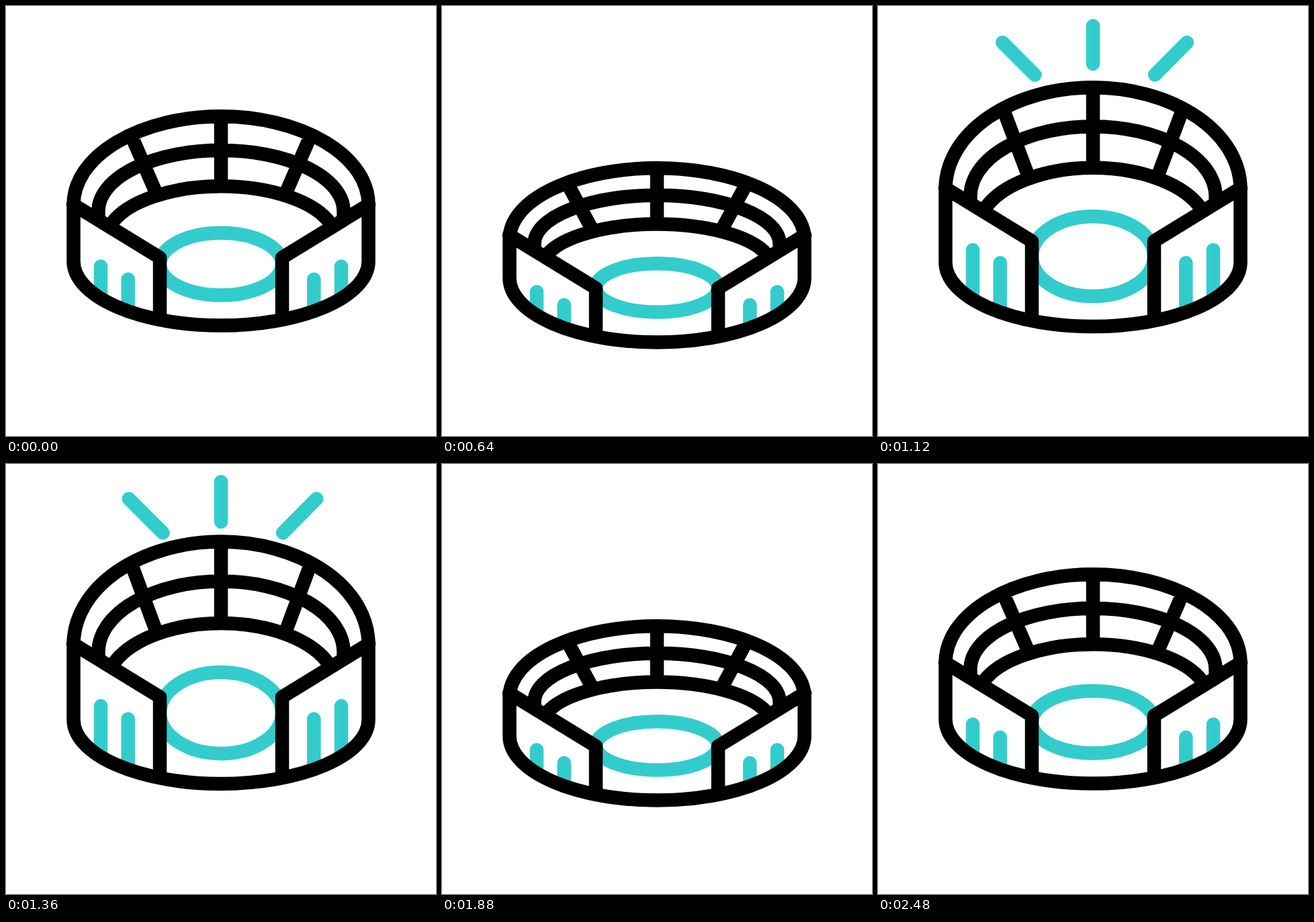
Recreate the animation shown at these times as an HTML page. Size 640x640 px, loop 2800 ms.

```html
<!DOCTYPE html>
<html lang="en">
<head>
<meta charset="utf-8">
<title>Stadium</title>
<style>
html, body { margin: 0; width: 100%; height: 100%; overflow: hidden; background: #fff; }
svg { display: block; width: 100%; height: 100%; }
path { fill: none; stroke-width: 20.5; stroke-linecap: round; stroke-linejoin: round; }
#teal { stroke: #33cccc; }
#black { stroke: #000; }
</style>
</head>
<body>
<svg viewBox="0 0 640 640">
  <path id="teal"/>
  <path id="black"/>
</svg>
<script>
const LOOP = 2800, STEP = 40, CX = 320, RX = 219.5, TOP = 164.3;
const teal = document.getElementById('teal');
const black = document.getElementById('black');

// Cubic bezier easing with control points (x1, 0) and (x2, 1).
function ease(x, x1, x2) {
  if (x <= 0) return 0;
  if (x >= 1) return 1;
  let lo = 0, hi = 1, s = 0.5;
  for (let i = 0; i < 30; i++) {
    s = (lo + hi) / 2;
    const v = 3 * x1 * s * (1 - s) ** 2 + 3 * x2 * s * s * (1 - s) + s ** 3;
    if (v < x) lo = s; else hi = s;
  }
  return s * s * (3 - 2 * s);
}

const REST = [0, 0], SQUASH = [77, 25], STRETCH = [-51, 0];

// start, end, from, to, easing x2; poses are [top shift, bottom shift]
const MOVES = [
  [200, 640, REST, SQUASH, 0.65],
  [640, 1320, SQUASH, STRETCH, 0.23],
  [1320, 1880, STRETCH, SQUASH, 0.23],
  [1880, 2480, SQUASH, REST, 0.4]
];

// inner x, inner y, outer x, outer y
const RAYS = [[320, 86, 320, 21], [233.5, 102.5, 178, 47], [412, 102.5, 467, 47]];

function poseAt(t) {
  const move = MOVES.find(m => t < m[1]);
  if (!move) return REST;
  const [start, end, from, to, x2] = move;
  const p = ease((t - start) / (end - start), 0.333, x2);
  return from.map((v, i) => v + (to[i] - v) * p);
}

function rayAt(t) {
  return t <= 1320 ? ease((t - 840) / 480, 0.333, 0.2)
                   : 1 - ease((t - 1320) / 240, 0.333, 0.5);
}

const line = (x1, y1, x2, y2) => `M${x1} ${y1}L${x2} ${y2}`;

// Height of an ellipse above its centre line at a distance dx from the axis.
const rise = (dx, rx, ry) => ry * Math.sqrt(1 - (dx / rx) ** 2);

function draw(t) {
  const [top, low] = poseAt(t);
  const mid = 0.572 * top + 0.06 * low;
  const wall = 295.5 + mid, corner = wall + 79, base = 380 + low;
  const front = dx => base + rise(dx, RX, 95.5);

  // The tiers scale together in height.
  const tierY = y => y + top * (1 - 0.0034 * (y - TOP)) + low * 0.0025 * (y - TOP);
  const y1 = tierY(295.5), r1 = y1 - tierY(TOP);
  const y2 = tierY(305), r2 = y2 - tierY(214.8);
  const y3 = tierY(350), r3 = y3 - tierY(268.3);
  let d = '';

  // outer shell and the inner tiers
  d += `M100.5 ${y1}A${RX} ${r1} 0 0 1 539.5 ${y1}L539.5 ${base}` +
       `A${RX} 95.5 0 0 1 100.5 ${base}Z`;
  d += `M137.5 ${wall + 22.7}L137.5 ${y2}A182.5 ${r2} 0 0 1 502.5 ${y2}L502.5 ${wall + 22.7}`;
  const end3 = y3 - rise(163, 172, r3);
  d += `M157 ${end3}A172 ${r3} 0 0 1 483 ${end3}`;
  d += line(CX, y1 - r1, CX, y3 - r3);

  const rx = 91, ry = (430.5 + low - 337.8 - mid) / 2, cy = 337.8 + mid + ry;
  let g = `M${CX - rx} ${cy}a${rx} ${ry} 0 0 1 ${2 * rx} 0a${rx} ${ry} 0 0 1 ${-2 * rx} 0Z`;
  const bar = 0.56 * top - 0.2 * low;

  for (const side of [-1, 1]) {
    const x = dx => CX + side * dx;
    d += line(x(134), y1 - rise(134, RX, r1), x(95), y3 - rise(95, 172, r3));
    d += line(x(220), wall, x(91), corner) + `L${x(91)} ${front(91)}`;
    g += line(x(179), 387.5 + bar, x(179), front(179));
    g += line(x(138.3), 406.8 + bar, x(138.3), front(138.3));
  }

  const p = rayAt(t);
  if (p > 0.003) {
    for (const [ax, ay, bx, by] of RAYS) {
      g += line(ax, ay, ax + (bx - ax) * p, ay + (by - ay) * p);
    }
  }
  teal.setAttribute('d', g);
  black.setAttribute('d', d);
}

const began = performance.now();
function tick() {
  const t = (performance.now() - began) % LOOP;
  draw(Math.floor(t / STEP) * STEP);
  requestAnimationFrame(tick);
}
draw(0);
requestAnimationFrame(tick);
</script>
</body>
</html>
```
